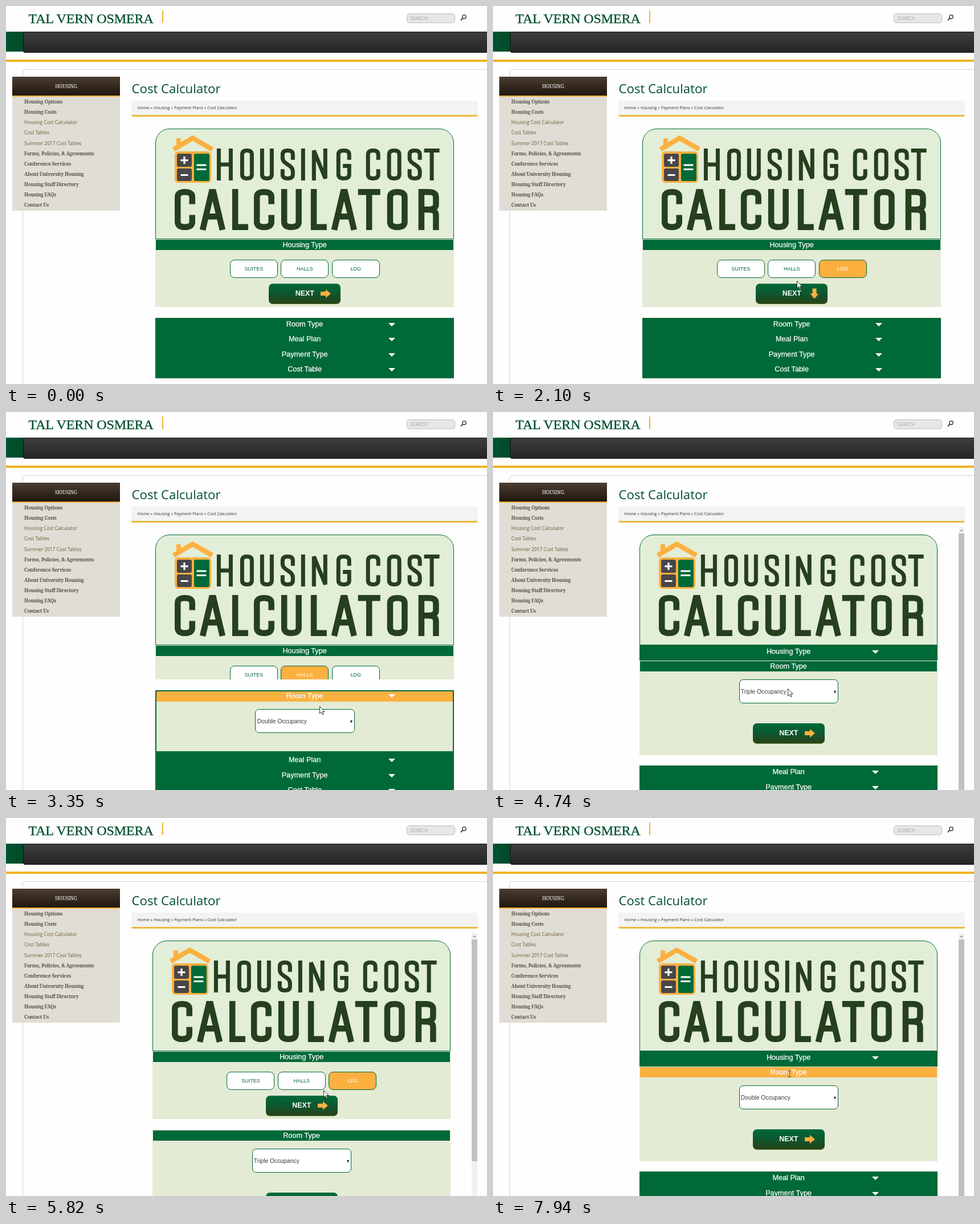
These frames come from a looping animation (844x663 px, 8 s). An HTML page:

```html
<!DOCTYPE html>
<html lang="en">
<head>
<meta charset="utf-8">
<title>Cost Calculator</title>
<style>
:root { --green: #006938; --orange: #fcb040; --cream: #e3ebd5; }
* { box-sizing: border-box; }
html, body { margin: 0; width: 100%; height: 100%; overflow: hidden; background: #fefefe; }
#stage { position: relative; width: 844px; height: 663px; overflow: hidden; font-family: "Liberation Sans", Arial, sans-serif; }
#stage > * { position: absolute; }
.sans { font-family: "Open Sans", sans-serif; }

.strip { top: 45px; height: 35px; left: 0; width: 844px; background: linear-gradient(90deg, #00542f, #00492a 30px); }
.strip::after { content: ""; position: absolute; left: 30px; right: -4px; height: 35px; border: 1px solid #111; border-radius: 3px; background: linear-gradient(#3e3e3e, #252525); }
.rule { top: 94px; left: 0; width: 844px; height: 4px; background: #f0b224; }
.frame { left: 29px; top: 111px; width: 830px; height: 570px; border: 1px solid #d3d3d3; border-radius: 4px 0 0; }
.search { left: 703px; top: 13px; width: 85px; height: 17px; border: 1px solid #bdbdbd; border-radius: 5px; background: #e7e7e7; color: #a8a8a8; font-size: 8.5px; line-height: 15px; padding-left: 5px; }

.side { left: 11px; top: 124px; width: 189px; height: 235px; background: #e0ddd5; font: bold 8.5px/18.13px "Noto Serif", serif; letter-spacing: -.27px; color: #57514a; }
.side h2 { margin: 0; height: 35px; border-bottom: 2px solid #efad2e; background: linear-gradient(#4b3d31, #20170e); color: #fff; font: 8.5px/33px "Noto Serif", serif; letter-spacing: -.1px; text-align: center; }
.side ul { margin: 0; padding: 0 0 0 21px; list-style: none; white-space: nowrap; }
.side .sub { font: 8.35px/18.13px "Open Sans", sans-serif; letter-spacing: 0; color: #6d5a35; }

h1 { margin: 0; left: 220.5px; top: 130px; font-weight: 400; font-size: 22.2px; line-height: 30px; color: #004f2d; white-space: nowrap; }
.crumbs { left: 220px; top: 166px; width: 608px; height: 28px; background: #f3f3f3; border-bottom: 3px solid #eeb93f; border-radius: 3px; padding-left: 10.5px; font-size: 7.4px; line-height: 24px; color: #3a3226; }

#panel { left: 262.3px; top: 215px; width: 523.6px; animation: dock 8s step-end infinite; }
.banner { display: block; width: 523.6px; height: 194px; border: 1px solid var(--green); border-radius: 25px 25px 0 0; background: #e2eed7; }
.sec { position: relative; --h: 26.5px; --l: 23px; --gap: 0px; --tri: 1; --bar: var(--green); --edge: transparent; --fill: transparent; --line: transparent; }
.sec::after { content: ""; position: absolute; inset: 0; border: 2px solid var(--edge); }
.head { position: relative; height: var(--h); line-height: var(--l); background: var(--bar); box-shadow: inset 0 0 0 1px var(--line); color: #fff; font-size: 12.7px; text-align: center; -webkit-text-stroke: .25px; }
.head::after { content: ""; position: absolute; left: 408.5px; top: calc(var(--l) / 2 - 2.5px); border: 6px solid transparent; border-top-color: #fff; border-bottom: 0; opacity: var(--tri); }
.body { position: relative; overflow: hidden; height: 0; background: var(--cream); }
.gap { height: var(--gap); background: var(--fill); }

.opt { position: absolute; top: 16px; width: 84px; height: 32px; border: 1px solid var(--green); border-radius: 8px; background: #fff; color: var(--green); font-size: 9.1px; line-height: 30px; text-align: center; }
.next { position: absolute; left: 199px; width: 126px; height: 36px; border-radius: 7px; border-bottom: 1.5px solid #66802e; background: linear-gradient(#006b39, #0a5a31 42%, #28421a); color: #fff; font: bold 12.4px/34px "Liberation Sans", Arial, sans-serif; padding-left: 46.5px; }
.next svg { position: absolute; left: 90px; top: 8px; width: 20px; height: 20px; transform-origin: 11.5px 11px; }
.pick { position: absolute; left: 175px; top: 13.5px; width: 174.5px; height: 42px; border: 1.5px solid var(--green); border-radius: 7px; background: #fff; color: #3c3c3c; font-size: 10.3px; line-height: 41px; }
.pick span { position: absolute; left: 2.5px; }
.pick::after { content: ""; position: absolute; right: 3px; top: 18.5px; border: 2.6px solid transparent; border-top: 5px solid #222; border-bottom: 0; }

.scroll { left: 817px; top: 202px; width: 10px; height: 461px; background: #f1f1f1; animation: show 8s step-end infinite; }
.scroll::before { content: ""; position: absolute; left: 2px; top: 4px; border: 3px solid transparent; border-bottom: 3.5px solid #999; border-top: 0; }
.scroll i { position: absolute; top: 11px; width: 10px; background: #c1c1c1; animation: thumb 8s infinite; }
#mouse { left: 0; top: 0; width: 12px; height: 18px; overflow: visible; animation: move 8s linear infinite, enter 8s step-end infinite; }

.house { animation: house 8s step-end infinite; }
.room { animation: room 8s step-end infinite; }
.meal, .pay, .cost { animation: pass 8s step-end 245ms infinite; }
.pay { animation-delay: 175ms; }
.cost { animation-delay: 70ms; }
.house .body { animation: fold 8s ease-in-out infinite; }
.room .body { animation: unfold 8s ease-in-out infinite; }
.house .next svg { animation: turn 8s linear infinite; }
.room .next svg { animation: turn2 8s linear infinite; }
.halls { animation: halls 8s step-end infinite; }
.last { animation: last 8s step-end infinite; }
.two { animation: two 8s step-end infinite; }
.three { animation: three 8s step-end infinite; }
.arrow { animation: arrow 8s step-end infinite; }
.beam { animation: beam 8s step-end infinite; }

@keyframes dock { 0% { margin-left: 0 } 44%, 100% { margin-left: -5.5px } }
@keyframes show { 0% { opacity: 0 } 44%, 100% { opacity: 1 } }
@keyframes enter { 0% { opacity: 0 } .875%, 100% { opacity: 1 } }
@keyframes arrow { 0% { opacity: 1 } 98.3%, 100% { opacity: 0 } }
@keyframes beam { 0% { opacity: 0 } 98.3%, 100% { opacity: 1 } }
@keyframes two { 0% { opacity: 1 } 50% { opacity: 0 } 75.5%, 100% { opacity: 1 } }
@keyframes three { 0% { opacity: 0 } 50% { opacity: 1 } 75.5%, 100% { opacity: 0 } }
@keyframes thumb { 0%, 62.5% { height: 462px } 66.2%, 75.5% { height: 389px } 79%, 100% { height: 462px } }
@keyframes pass { 0% { --bar: var(--orange) } 1.1%, 100% { --bar: var(--green) } }
@keyframes fold { 0%, 39.25% { height: 99px } 44%, 62.5% { height: 0 } 66.2%, 75.5% { height: 99px } 79%, 100% { height: 0 } }
@keyframes unfold { 0%, 39.25% { height: 0 } 44%, 100% { height: 146.5px } }
@keyframes house {
  0% { --h: 20px; --l: 20px; --gap: 18.5px; --tri: 0; --line: var(--cream); --bar: var(--green) }
  44% { --h: 26.5px; --l: 23px; --gap: 0px; --tri: 1; --line: transparent }
  61.3% { --bar: var(--orange) }
  62.5% { --h: 20px; --l: 20px; --gap: 18.5px; --tri: 0; --line: var(--cream) }
  67.6% { --bar: var(--green) }
  79%, 100% { --h: 26.5px; --l: 23px; --gap: 0px; --tri: 1; --line: transparent }
}
@keyframes room {
  0% { --h: 26.5px; --l: 23px; --gap: 0px; --tri: 1; --bar: var(--green); --edge: transparent; --fill: transparent; --line: transparent }
  3.9% { --bar: var(--orange) }
  4.8% { --bar: var(--green) }
  39.25% { --h: 20px; --l: 20px; --gap: 4.5px; --edge: var(--green); --fill: var(--green) }
  40.5% { --bar: var(--orange) }
  42.5% { --bar: var(--green) }
  44% { --gap: 18px; --tri: 0; --edge: transparent; --fill: transparent; --line: var(--cream) }
  60.4% { --bar: var(--orange) }
  61.2% { --bar: var(--green) }
  98.3%, 100% { --h: 20px; --l: 20px; --gap: 18px; --tri: 0; --bar: var(--orange); --line: var(--cream) }
}
@keyframes halls {
  0%, 21.5%, 70%, 100% { background: #fff; color: var(--green) }
  14%, 27.2% { background: var(--orange); color: #fff }
}
@keyframes last {
  0%, 30% { background: #fff; color: var(--green) }
  7%, 69.2%, 100% { background: var(--orange); color: #fff }
}
@keyframes turn {
  0%, 5%, 7.5%, 21.9%, 28.5%, 35.6%, 45%, 73.5%, 80%, 100% { transform: rotate(0) }
  6.2% { transform: rotate(60deg) }
  24%, 26.6%, 37.5%, 44%, 75.5%, 79% { transform: rotate(90deg) }
}
@keyframes turn2 { 0%, 77%, 80.9%, 100% { transform: rotate(0) } 78.2%, 78.6% { transform: rotate(90deg) } }
@keyframes move {
  0%, .875% { transform: translate(540px, 645px) }
  2.6% { transform: translate(546px, 612px) }
  4.4% { transform: translate(560px, 558px) }
  5.4% { transform: translate(575px, 510px) }
  7% { transform: translate(600px, 475px) }
  8.2%, 11.3% { transform: translate(611px, 463px) }
  13% { transform: translate(580px, 460px) }
  15% { transform: translate(545px, 464px) }
  18%, 21% { transform: translate(523px, 466px) }
  22% { transform: translate(528px, 490px) }
  23.75% { transform: translate(535px, 503px) }
  25.4% { transform: translate(535px, 500px) }
  26.2%, 26.8% { transform: translate(533px, 482px) }
  27.5% { transform: translate(526px, 473px) }
  30.9%, 32% { transform: translate(521px, 470px) }
  32.6%, 34.6% { transform: translate(506px, 467px) }
  36.2% { transform: translate(520px, 500px) }
  38% { transform: translate(535px, 508px) }
  41.8%, 42.4% { transform: translate(550px, 516px) }
  44.5%, 45.6% { transform: translate(552px, 520px) }
  48% { transform: translate(545px, 497px) }
  52.5%, 56.2% { transform: translate(525px, 494px) }
  58.5%, 59.9% { transform: translate(517px, 485px) }
  60.8% { transform: translate(518px, 445px) }
  62%, 67.1% { transform: translate(519px, 421px) }
  68% { transform: translate(540px, 435px) }
  69.5% { transform: translate(590px, 458px) }
  70.8%, 72.4% { transform: translate(603px, 463px) }
  72.7%, 73.2% { transform: translate(557px, 477px) }
  74% { transform: translate(530px, 500px) }
  75.4% { transform: translate(525px, 510px) }
  79.5%, 80.5% { transform: translate(527px, 508px) }
  82.7%, 83.8% { transform: translate(531px, 498px) }
  85.8%, 87.5% { transform: translate(532px, 488px) }
  88.6%, 90.4% { transform: translate(508px, 513px) }
  91.5%, 93.3% { transform: translate(510px, 507px) }
  93.4%, 96.2% { transform: translate(510px, 500px) }
  97.5% { transform: translate(514px, 475px) }
  99.2%, 100% { transform: translate(520px, 449px) }
}
</style>
</head>
<body>
<div id="stage">
  <svg width="844" height="44" style="left:0;top:0">
    <text x="39.5" y="30" font-family="Liberation Serif, serif" font-size="24" letter-spacing="-.1" fill="#00502d" stroke="#00502d" stroke-width=".35">TAL VERN OSMERA</text>
    <path d="M275 8V30" stroke="#efb433" stroke-width="2"/>
    <g fill="none" stroke="#4a4a4a"><circle cx="804" cy="19" r="3.2" stroke-width="1.5"/><path d="M801.5 21.5L798 25" stroke-width="2.2"/></g>
  </svg>
  <div class="search sans">SEARCH</div>
  <div class="strip"></div>
  <div class="rule"></div>
  <div class="frame"></div>
  <div class="side">
    <h2>HOUSING</h2>
    <ul>
      <li>Housing Options</li>
      <li>Housing Costs</li>
      <li class="sub">Housing Cost Calculator</li>
      <li class="sub">Cost Tables</li>
      <li class="sub">Summer 2017 Cost Tables</li>
      <li>Forms, Policies, &amp; Agreements</li>
      <li>Conference Services</li>
      <li>About University Housing</li>
      <li>Housing Staff Directory</li>
      <li>Housing FAQs</li>
      <li>Contact Us</li>
    </ul>
  </div>
  <h1 class="sans">Cost Calculator</h1>
  <div class="crumbs sans">Home » Housing » Payment Plans » Cost Calculator</div>

  <div id="panel">
    <svg class="banner" viewBox="263 216 522 192">
      <rect x="296" y="255" width="64" height="55" rx="6" fill="#fcb040"/>
      <path d="M294 251.500L327.500 231.500L362 251.500" fill="none" stroke="#fcb040" stroke-width="8.500"/>
      <path d="M299 232h8v12h-8z" fill="#fcb040"/>
      <rect x="300" y="259" width="26" height="23" rx="3" fill="#484649"/>
      <rect x="300" y="285" width="26" height="22" rx="3" fill="#484649"/>
      <rect x="330" y="259" width="27" height="48" rx="3" fill="#006938"/>
      <path d="M306.500 270.500h13M313 264v13M306.500 296.500h13M334.500 279h17M334.500 286.500h17" stroke="#fff" stroke-width="3.200"/>
      <g id="words" fill="none" stroke="#263f1e" stroke-linecap="square"></g>
    </svg>
    <div class="sec house">
      <div class="head">Housing Type</div>
      <div class="body">
        <div class="opt" style="left:130.700px">SUITES</div>
        <div class="opt halls" style="left:220px">HALLS</div>
        <div class="opt last" style="left:309.500px">LDG</div>
        <div class="next" style="top:58px">NEXT<svg><path d="M1 6H10V2L19 9.500L10 17V13H1Z" fill="#fcb040"/></svg></div>
      </div>
      <div class="gap"></div>
    </div>
    <div class="sec room">
      <div class="head">Room Type</div>
      <div class="body">
        <div class="pick"><span class="two">Double Occupancy</span><span class="three">Triple Occupancy</span></div>
        <div class="next" style="top:90.500px">NEXT<svg><path d="M1 6H10V2L19 9.500L10 17V13H1Z" fill="#fcb040"/></svg></div>
      </div>
      <div class="gap"></div>
    </div>
    <div class="sec meal"><div class="head">Meal Plan</div></div>
    <div class="sec pay"><div class="head">Payment Type</div></div>
    <div class="sec cost"><div class="head">Cost Table</div></div>
  </div>

  <div class="scroll"><i></i></div>
  <svg id="mouse">
    <path class="arrow" d="M.5 .5V13L3.400 10.300L5.300 14.800L7.300 14L5.400 9.600H9.300Z" fill="#fff" stroke="#222" stroke-width=".9"/>
    <path class="beam" d="M-2.500 -5.500H2.500M0 -5.500V5.500M-2.500 5.500H2.500" fill="none" stroke="#444"/>
  </svg>
</div>
<script>
// Letter strokes on a unit box
const hook = "M1,.26L1,.14Q1,0 .5,0Q0,0 0,.14", bowl = "L0,.86Q0,1 .5,1Q1,1 1,.86";
const glyphs = {
  H: "M0,0L0,1M1,0L1,1M0,.5L1,.5",
  O: "M0,.14" + bowl + "L1,.14Q1,0 .5,0Q0,0 0,.14Z",
  U: "M0,0" + bowl + "L1,0",
  S: hook + "L0,.26C0,.5 1,.5 1,.74L1,.86Q1,1 .5,1Q0,1 0,.86L0,.74",
  I: "M.5,0L.5,1",
  N: "M0,1L0,0L1,1L1,0",
  C: hook + bowl + "L1,.74",
  G: hook + bowl + "L1,.55L.6,.55",
  T: "M0,0L1,0M.5,0L.5,1",
  L: "M0,0L0,1L1,1",
  A: "M0,1L.45,0L.55,0L1,1M.18,.7L.82,.7",
  R: "M0,1L0,0L.5,0Q1,0 1,.14L1,.36Q1,.5 .5,.5L0,.5M.5,.5Q1,.5 1,.66L1,1"
};

function word(text, lefts, widths, top, height, pen) {
  const d = [...text].map((ch, i) => glyphs[ch].replace(/([\d.]+),([\d.]+)/g, (_, u, v) => {
    const x = lefts[i] + pen / 2 + u * (widths[i] - pen);
    const y = top + pen / 2 + v * (height - pen);
    return x.toFixed(1) + "," + y.toFixed(1);
  })).join("");
  const path = document.createElementNS("http://www.w3.org/2000/svg", "path");
  path.setAttribute("d", d);
  path.setAttribute("stroke-width", pen);
  document.getElementById("words").append(path);
}

word("HOUSINGCOST", [370, 411, 446, 482, 517, 537, 580, 632, 669, 705, 734],
  [28, 24, 24, 25, 9, 27, 26, 25, 25, 25, 27], 250, 56, 7);
word("CALCULATOR", [296, 341, 397, 435, 483, 535, 572, 618, 669, 724],
  [36, 43, 28, 36, 36, 28, 43, 39, 36, 36], 321, 72, 10.5);
</script>
</body>
</html>
```
